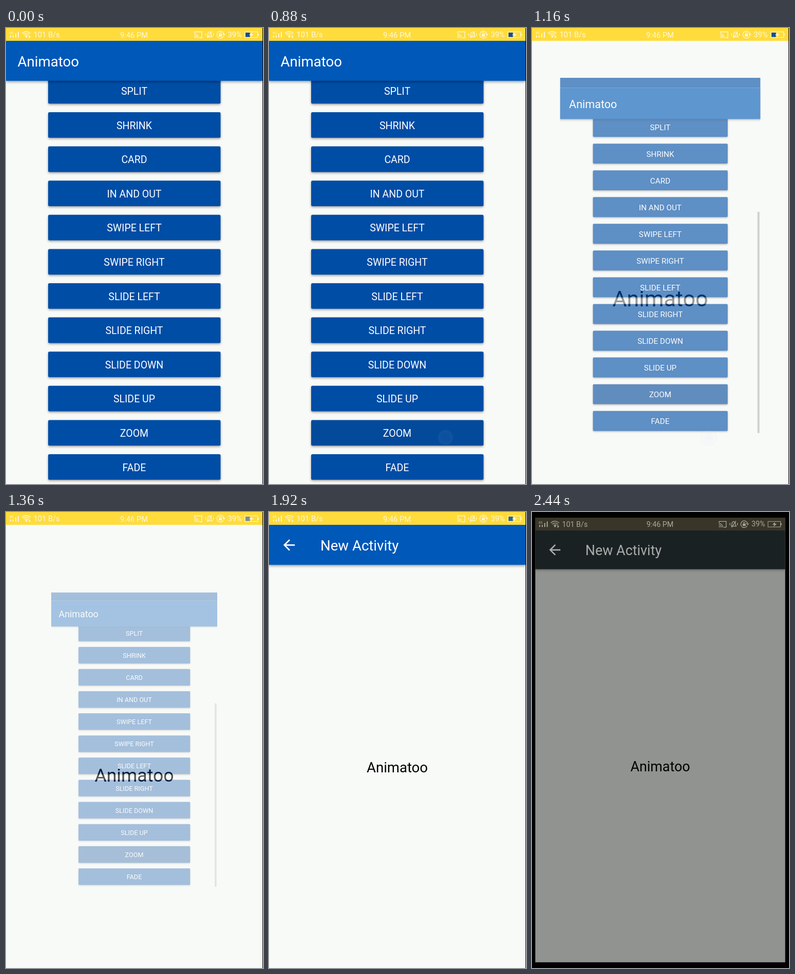
An HTML page with a canvas that plays this animation: 500x888 px, repeating every 2.48 s.

```html
<!DOCTYPE html>
<html lang="en">
<head>
<meta charset="utf-8">
<title>Zoom transition</title>
<style>
  html, body { margin: 0; width: 100%; height: 100%; overflow: hidden; background: #000; }
  canvas { display: block; width: 500px; height: 888px; }
</style>
</head>
<body>
<canvas id="stage" width="500" height="888"></canvas>
<script>
const W = 499, H = 888, LOOP = 2480, STEP = 40;
const ZOOM = { start: 919, length: 966 };
const BUTTONS = ['SPLIT', 'SHRINK', 'CARD', 'IN AND OUT', 'SWIPE LEFT', 'SWIPE RIGHT',
  'SLIDE LEFT', 'SLIDE RIGHT', 'SLIDE DOWN', 'SLIDE UP', 'ZOOM', 'FADE'];
const BUTTON = { x: 82, y: 97.4, w: 335.4, h: 49.8, pitch: 66.6 };

// Each colour pairs its normal value with its value once the screen has dimmed.
const COLORS = {
  status: [[255, 220, 60], [57, 54, 41]],
  icon: [[255, 248, 218], [168, 168, 156]],
  bar: [[0, 88, 184], [26, 33, 35]],
  strip: [[0, 77, 166], [22, 28, 32]],
  page: [[248, 250, 248], [145, 147, 144]],
  title: [[255, 255, 255], [170, 172, 170]]
};

const screen = document.getElementById('stage').getContext('2d');
const layerCanvas = Object.assign(document.createElement('canvas'), { width: 500, height: H });
const layer = layerCanvas.getContext('2d');

const clamp = v => Math.min(1, Math.max(0, v));
const ramp = (t, from, to) => clamp((t - from) / (to - from));
const lerp = (a, b, k) => a + (b - a) * k;
let dim = 0;
const color = name => {
  const [from, to] = COLORS[name];
  return `rgb(${from.map((v, i) => Math.round(lerp(v, to[i], dim))).join(',')})`;
};

function scaleAbout(c, s) {
  c.translate(W / 2, H / 2);
  c.scale(s, s);
  c.translate(-W / 2, -H / 2);
}

function text(c, str, x, y, size, fill, align = 'left') {
  c.font = `400 ${size}px Roboto, sans-serif`;
  c.textAlign = align;
  c.fillStyle = fill;
  c.fillText(str, x, y);
}

function rect(c, x, y, w, h, fill) {
  c.fillStyle = fill;
  c.fillRect(x, y, w, h);
}

function shadow(c, alpha, blur, dy) {
  c.shadowColor = `rgba(0,0,0,${alpha})`;
  c.shadowBlur = blur;
  c.shadowOffsetY = dy;
}

function toolbar(c, s, label, x) {
  c.save();
  shadow(c, 0.4, 5 * s, 2 * s);
  rect(c, 0, 25, W, 77.8, color('bar'));
  c.restore();
  rect(c, 0, 0, W, 25, color('strip'));
  text(c, label, x, 75, 27.6, color('title'));
}

function button(c, s, label, i, lift, tint) {
  const y = BUTTON.y + i * BUTTON.pitch;
  c.save();
  shadow(c, lerp(0.38, 0.3, lift), lerp(4, 10, lift) * s, lerp(2, 7, lift) * s);
  c.fillStyle = tint ? '#044a9b' : color('strip');
  c.beginPath();
  c.roundRect(BUTTON.x, y, BUTTON.w, BUTTON.h, 2.5);
  c.fill();
  c.restore();
  text(c, label, W / 2, y + 32.6, 19.5, '#fff', 'center');
}

function listPage(c, s, t) {
  c.save();
  scaleAbout(c, s);
  c.beginPath();
  c.rect(0, 0, W, H);
  c.clip();
  rect(c, 0, 0, W, H, color('page'));
  const lift = ramp(t, 330, 430) * (1 - ramp(t, 660, 820));
  BUTTONS.forEach((label, i) => {
    const pressed = label === 'ZOOM';
    button(c, s, label, i, pressed ? lift : 0, pressed && t > 700);
  });
  if (t > ZOOM.start) rect(c, 491.5, 334, 5, 551, '#b6b8b6');
  toolbar(c, s, 'Animatoo', 22.5);
  c.restore();
}

const arrow = new Path2D('M20 11H7.83l5.59-5.59L12 4l-8 8 8 8 1.41-1.41L7.83 13H20v-2z');

function detailPage(c, s) {
  c.save();
  scaleAbout(c, s);
  rect(c, 0, 0, W, H, color('page'));
  toolbar(c, s, 'New Activity', 100);
  c.save();
  c.translate(22.4, 47.6);
  c.scale(1.39, 1.39);
  c.fillStyle = color('title');
  c.fill(arrow);
  c.restore();
  text(c, 'Animatoo', W / 2, 506.8, 27.5, '#000', 'center');
  c.restore();
}

function line(c, points) {
  c.beginPath();
  points.forEach(([x, y]) => c.lineTo(x, y));
  c.stroke();
}

function arc(c, x, y, r, from = 0, to = 2 * Math.PI) {
  c.beginPath();
  c.arc(x, y, r, from, to);
  c.stroke();
}

function statusBar(c, t) {
  const ink = color('icon');
  rect(c, 0, 0, W, 25, color('status'));
  text(c, '101 B/s', 53.5, 18, 14.7, ink);
  text(c, '9:46 PM', 249, 18.5, 14.7, ink, 'center');
  text(c, '39%', 431.5, 17.5, 14.7, ink);
  text(c, '4G', 6.5, 12, 6.5, ink);
  c.strokeStyle = ink;
  c.lineWidth = 1.3;

  // Signal bars
  [4, 4, 8, 11].forEach((h, i) => rect(c, 8 + i * 5, 18.5 - h, 2, h, ink));

  // Wi-Fi
  [4, 7.5, 11].forEach(r => arc(c, 39.5, 18, r, -Math.PI * 0.77, -Math.PI * 0.23));
  c.beginPath();
  c.arc(39.5, 17, 1.8, 0, 7);
  c.fill();
  line(c, [[45, 14], [45, 19], [47.5, 16.5]]);

  // Cast
  line(c, [[367, 10.5], [367, 7.5], [381, 7.5], [381, 19], [376, 19]]);
  [2, 5, 8].forEach(r => arc(c, 366.5, 19.5, r, -Math.PI / 2, 0));

  // Muted bell
  line(c, [[391, 17], [392.5, 14], [393, 9.5], [396, 7.5], [399, 9.5], [399.5, 14], [401, 17], [391, 17]]);
  line(c, [[392, 19.5], [400.5, 6.5]]);
  line(c, [[388.5, 10.5], [388.5, 15]]);
  line(c, [[403.5, 10.5], [403.5, 15]]);

  // Rotation lock
  arc(c, 417, 13, 6.8, 0.5, 6.1);
  rect(c, 414, 12, 6, 4.5, ink);
  arc(c, 417, 11.5, 2, Math.PI, 0);
  line(c, [[421.5, 11.5], [424, 14], [426, 11.5]]);

  // Battery
  const charge = t < 1200 ? '#174b9c' : t < 1520 ? '#7f8b92' : t < 2000 ? '#2465a8' : '#08ae96';
  c.lineWidth = 1;
  c.strokeRect(464.5, 7.5, 25, 11);
  rect(c, 490, 11, 1.5, 4, ink);
  c.globalAlpha = 1 - dim;
  rect(c, 466, 9, 8.5, 8.5, charge);
  c.globalAlpha = 1;
  c.fillStyle = ink;
  c.beginPath();
  [[479, 8.5], [473, 13.7], [477, 13.7], [475.5, 18], [482, 12.3], [478, 12.3]].forEach(p => c.lineTo(...p));
  c.fill();
}

function touchDot(c, t) {
  const fade = t < 1200 ? 0.06 : 0;
  const alpha = ramp(t, 300, 360) * Math.max(fade, 1 - ramp(t, 640, 760));
  if (!alpha) return;
  const g = c.createRadialGradient(343.5, 797.5, 0, 343.5, 797.5, 18);
  [[0, 'rgba(130,176,220,.95)'], [0.5, 'rgba(160,196,230,.95)'], [0.6, 'rgba(205,224,240,.95)'],
    [0.77, 'rgba(200,222,240,.95)'], [0.83, 'rgba(40,130,205,.5)'], [1, 'rgba(40,130,205,0)']]
    .forEach(stop => g.addColorStop(...stop));
  c.globalAlpha = alpha;
  c.fillStyle = g;
  c.beginPath();
  c.arc(343.5, 797.5, 18, 0, 7);
  c.fill();
  c.globalAlpha = 1;
}

function draw(t) {
  const c = screen;
  const u = clamp((t - ZOOM.start) / ZOOM.length);
  const left = (1 - u) ** 2;
  dim = ramp(t, 2240, 2440);
  rect(c, 0, 0, 500, H, '#000');
  c.save();
  scaleAbout(c, 1 - 0.025 * dim);
  c.beginPath();
  c.rect(0, 0, W, H);
  c.clip();
  if (u === 0) {
    listPage(c, 1, t);
  } else {
    detailPage(c, 1 + left);
    if (u < 1) {
      layer.clearRect(0, 0, 500, H);
      listPage(layer, 0.5 + left / 2, t);
      c.globalAlpha = clamp(1.035 - u) ** 2;
      c.drawImage(layerCanvas, 0, 0);
      c.globalAlpha = 1;
    }
  }
  touchDot(c, t);
  statusBar(c, t);
  c.restore();
}

let begin;
function tick(now) {
  begin ??= now;
  draw(Math.floor(((now - begin) % LOOP) / STEP) * STEP);
  requestAnimationFrame(tick);
}
draw(0);
requestAnimationFrame(tick);
</script>
</body>
</html>
```
